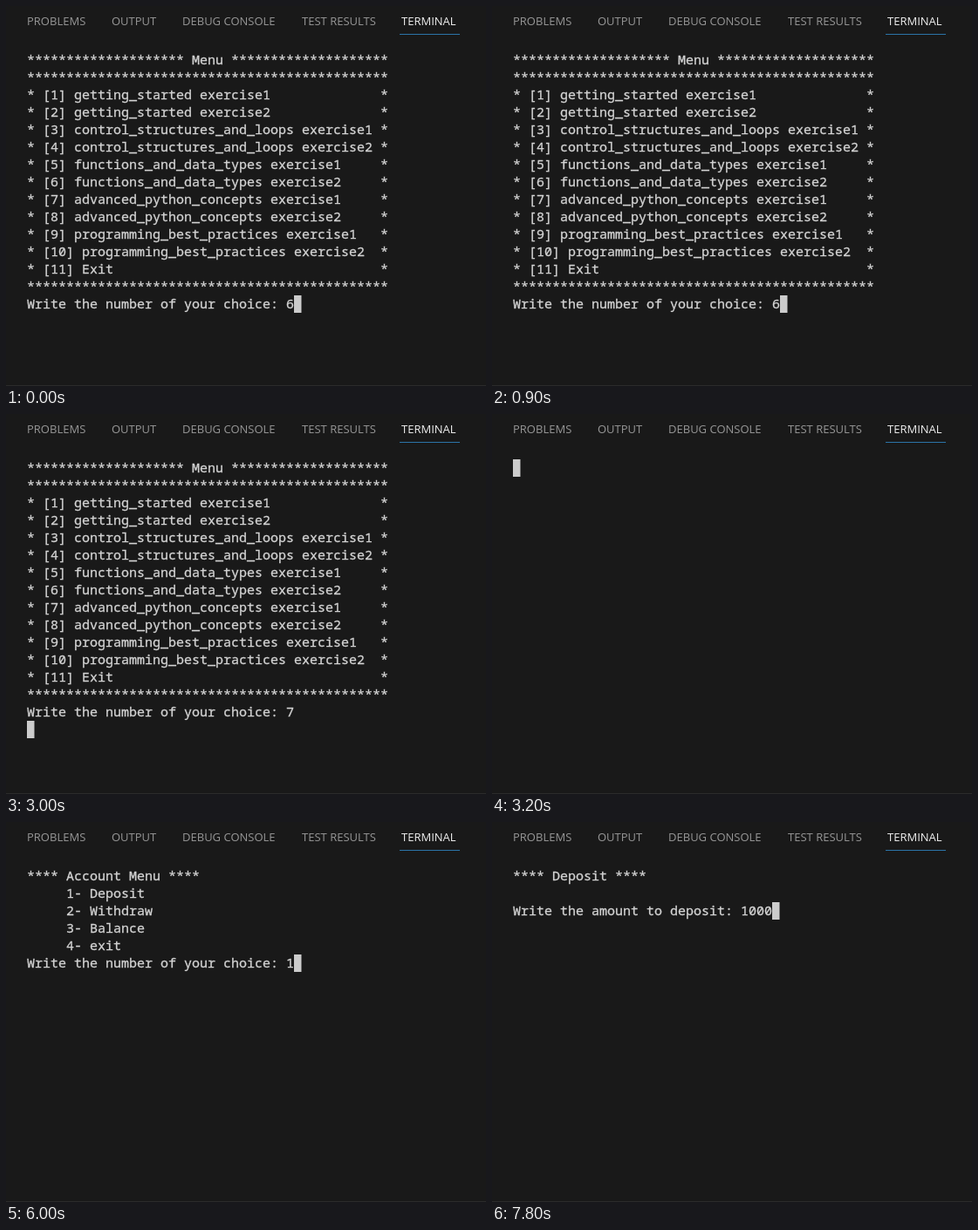
An HTML page with a canvas that plays this animation: 550 by 436 pixels, repeating every 8 s.

```html
<!DOCTYPE html>
<html lang="en">
<head>
<meta charset="utf-8">
<title>Terminal menu</title>
<style>
  html, body { margin: 0; width: 100%; height: 100%; overflow: hidden; background: #191919; }
  canvas { display: block; width: 550px; height: 436px; }
</style>
</head>
<body>
<canvas id="stage" width="550" height="436"></canvas>
<script>
const ctx = document.getElementById('stage').getContext('2d');
const LOOP = 8000;
const LEFT = 24, TOP = 52, CELL = 9, ROW = 20;
const MONO = '15px "Noto Sans Mono", "DejaVu Sans Mono", monospace';
const SANS = '13px "Open Sans", "Noto Sans", sans-serif';

const tabs = [
  ['PROBLEMS', 24], ['OUTPUT', 121], ['DEBUG CONSOLE', 202],
  ['TEST RESULTS', 339], ['TERMINAL', 453]
];

const topics = [
  'getting_started', 'control_structures_and_loops', 'functions_and_data_types',
  'advanced_python_concepts', 'programming_best_practices'
];
const items = topics.flatMap(t => [t + ' exercise1', t + ' exercise2']).concat('Exit');
const stars = n => '*'.repeat(n);
const choice = 'Write the number of your choice: ';

const mainMenu = [
  stars(20) + ' Menu ' + stars(20),
  stars(46),
  ...items.map((item, i) => `* [${i + 1}] ${item}`.padEnd(45) + '*'),
  stars(46),
  choice
];
const accountMenu = [
  '**** Account Menu ****',
  ...['Deposit', 'Withdraw', 'Balance', 'exit'].map((s, i) => `     ${i + 1}- ${s}`),
  choice
];
const deposit = ['**** Deposit ****', '', 'Write the amount to deposit: '];

// Each step: start time, screen lines, typed input ('\n' is Enter)
const steps = [
  [0, mainMenu, '6'],
  [1900, mainMenu, ''],
  [2200, mainMenu, '7'],
  [3000, mainMenu, '7\n'],
  [3200, [''], ''],
  [3300, accountMenu, ''],
  [5100, accountMenu, '1'],
  [6100, accountMenu, '1\n'],
  [6400, deposit, ''],
  [7100, deposit, '1'],
  [7500, deposit, '10'],
  [7600, deposit, '100'],
  [7800, deposit, '1000']
];

function drawTabs() {
  ctx.font = SANS;
  for (const [label, x] of tabs) {
    ctx.fillStyle = label === 'TERMINAL' ? '#f0f0f0' : '#979797';
    ctx.fillText(label, x, 22);
  }
  ctx.fillStyle = '#2b74a8';
  ctx.fillRect(451, 32, 69, 1);
}

function drawTerminal(screen, input) {
  const lines = (screen.join('\n') + input).split('\n');
  const last = lines.length - 1;
  ctx.font = MONO;
  ctx.fillStyle = ctx.strokeStyle = '#d4d4d4';
  ctx.lineWidth = 0.3; // a thin outline gives the text its heavier weight
  lines.forEach((line, i) => {
    const y = TOP + i * ROW + 15;
    ctx.fillText(line, LEFT, y);
    ctx.strokeText(line, LEFT, y);
  });
  ctx.fillStyle = '#cccccc';
  ctx.fillRect(LEFT + lines[last].length * CELL, TOP + last * ROW, CELL - 0.5, ROW);
}

function draw(now) {
  const t = now % LOOP;
  const [, screen, input] = steps.filter(s => s[0] <= t).pop();
  ctx.fillStyle = '#191919';
  ctx.fillRect(0, 0, 550, 436);
  ctx.fillStyle = '#2b2b2b';
  ctx.fillRect(0, 435, 550, 1);
  drawTabs();
  drawTerminal(screen, input);
}

function frame() {
  draw(performance.now());
  requestAnimationFrame(frame);
}
frame();
</script>
</body>
</html>
```
